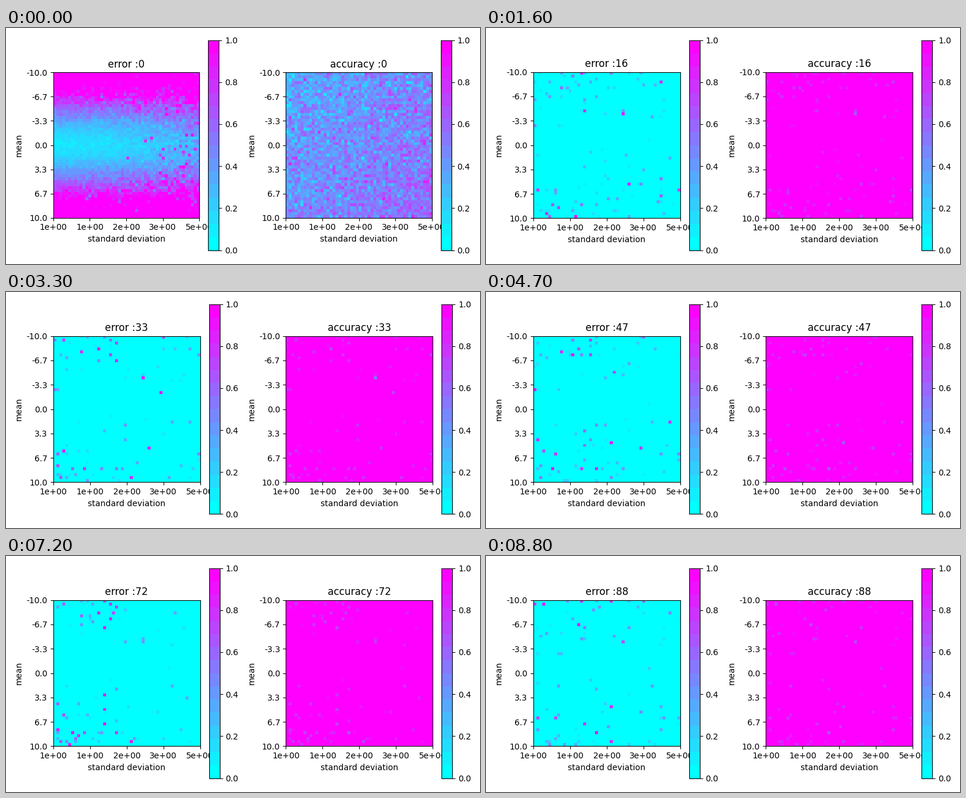
Write a matplotlib script that moves like this. It is 800 px wide and 400 px high and loops after 8900 ms.

```python
import matplotlib.pyplot as plt
import numpy as np
from matplotlib.animation import FuncAnimation

W, H, DPI = 800, 400, 100
FRAMES, STEP = 89, 100
N = 50

plt.rcParams.update({"font.family": "DejaVu Sans", "font.size": 10})

base = np.random.default_rng(7)
means = np.linspace(-10, 10, N)[:, None]
spread = np.linspace(0, 1, N)[None, :]


def speckle(rng, size):
    return size * rng.standard_normal((N, N))


def pick_cells(rng, count):
    """Choose cells, mostly with far means and small deviations."""
    weight = (0.06 + (np.abs(means) / 10) ** 1.6) * (1 - 0.65 * spread)
    flat = rng.choice(N * N, count, False, weight.ravel() / weight.sum())
    mask = np.zeros(N * N, bool)
    mask[flat] = True
    return mask.reshape(N, N)


weak = pick_cells(base, 140)
stubborn = pick_cells(base, 55)

# state before training: error grows with |mean|, accuracy is near chance
err0 = 0.12 + 0.032 * np.abs(means) ** 1.65 * (1 - 0.12 * spread)
err0 = err0 + 0.2 * spread ** 2
err0 *= 1 + (0.6 + spread) * speckle(base, 0.14)
err0 += 0.5 * (base.random((N, N)) < 0.06 * spread ** 3)
acc0 = 0.34 + 0.13 * spread + 0.006 * (means + 10)
acc0 = np.clip(acc0 + speckle(base, 0.125), 0.05, 0.85)


def fields(i):
    """Error and accuracy maps after epoch i."""
    if i == 0:
        return err0, acc0
    rng = np.random.default_rng(500 + i)
    noise = 1 + speckle(rng, 0.15)
    err = err0 * np.exp(-i / 1.6) * noise
    acc = 1 - (1 - acc0) * np.exp(-i / 2) * noise

    on, u = rng.random((2, N, N))
    busy = 0.42 + 0.3 * np.exp(-i / 12)
    wavers = weak & (on < busy)
    fails = stubborn & (on < 0.55)
    err += wavers * (0.06 + 0.35 * u ** 2) + fails * (0.3 + 0.65 * u)
    acc -= wavers * (0.05 + 0.15 * u) + fails * (0.14 + 0.12 * u)
    return err, acc


def make_panel(fig, ax):
    im = ax.imshow(np.zeros((N, N)), cmap=plt.get_cmap("cool", 16),
                   vmin=0, vmax=1, interpolation="nearest")
    stds = [f"{v:.0e}" for v in np.geomspace(1, 5, 5)]
    mus = [f"{round(v, 1) + 0.0:.1f}" for v in np.linspace(-10, 10, 7)]
    ax.set_xticks(np.linspace(-0.5, N - 0.5, 5), stds)
    ax.set_yticks(np.linspace(-0.5, N - 0.5, 7), mus)
    ax.set_xlabel("standard deviation")
    ax.set_ylabel("mean")
    fig.colorbar(im, ax=ax, ticks=np.linspace(0, 1, 6))
    return im


fig, axes = plt.subplots(1, 2, figsize=(W / DPI, H / DPI), dpi=DPI,
                         facecolor="white")
images = [make_panel(fig, ax) for ax in axes]


def draw(i):
    for ax, im, name, data in zip(axes, images, ("error", "accuracy"), fields(i)):
        im.set_data(np.clip(data, 0, 1))
        ax.set_title(f"{name} :{i}")
    # each epoch refits the layout, starting from the default margins
    if i == 0:
        fig.subplots_adjust(left=0.125, right=0.9, bottom=0.11, top=0.88,
                            wspace=0.2, hspace=0.2)
    fig.tight_layout()
    return []


anim = FuncAnimation(fig, draw, frames=FRAMES, interval=STEP,
                     init_func=lambda: draw(0), repeat=True, repeat_delay=0)
plt.show()
```
